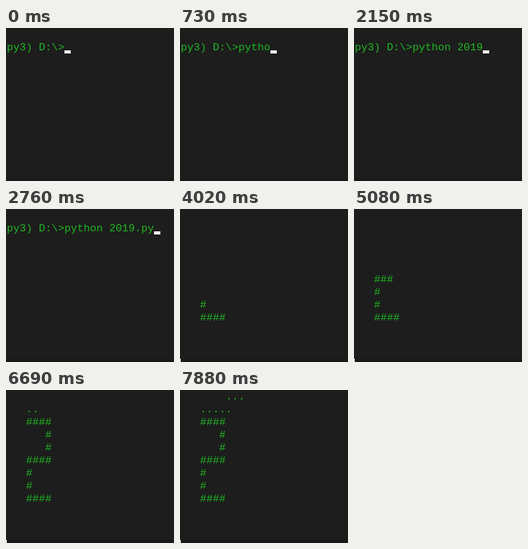
Animation of 210 by 192 pixels, one loop 8 s. Source, as an HTML page:

```html
<!DOCTYPE html>
<html lang="en">
<head>
<meta charset="utf-8">
<title>Terminal drawing</title>
<style>
  html, body { margin: 0; width: 100%; height: 100%; overflow: hidden; background: #1c1d1c; }
  svg { display: block; }
  text {
    font: 13.333px "Liberation Mono", "Courier New", monospace;
    fill: #22b824;
    white-space: pre;
  }
</style>
</head>
<body>
<svg id="stage" width="210" height="192" viewBox="0 0 210 192">
  <rect width="210" height="192" fill="#1c1d1c"/>
  <rect y="188" width="210" height="4" fill="#191919"/>
  <text id="line" x="1" y="28"></text>
  <g id="marks"></g>
  <rect id="cursor" width="8" height="4" fill="#ebebeb"/>
</svg>
<script>
const LOOP = 8000, CLEAR = 3220, CELL = 8, ROW = 16, LEFT = 1, BASE = 12;
const PROMPT = "py3) D:\\>", COMMAND = "python 2019.py";

// Time at which each character of the command appears.
const KEYS = [70, 270, 400, 600, 730, 860, 1130, 1740, 1740, 1940, 2140, 2340, 2540, 2740];

// The trail: start cell, direction, length and character of each stroke.
const STROKES = [
  [6, 8, -1, 0, 4, "#"],
  [3, 7, 0, -1, 3, "#"],
  [4, 5, 1, 0, 3, "#"],
  [6, 4, 0, -1, 3, "#"],
  [5, 2, -1, 0, 3, "#"],
  [3, 1, 1, 0, 5, "."],
  [7, 0, 1, 0, 3, "."],
];

const get = id => document.getElementById(id);
const line = get("line"), group = get("marks"), cursor = get("cursor");
const cellX = col => LEFT + col * CELL;
const rowY = row => BASE + row * ROW;

const marks = STROKES.flatMap(([col, row, dx, dy, count, char]) =>
  Array.from({ length: count }, (_, i) => {
    const mark = document.createElementNS("http://www.w3.org/2000/svg", "text");
    mark.setAttribute("x", cellX(col + dx * i));
    mark.setAttribute("y", rowY(row + dy * i));
    mark.textContent = char;
    return group.appendChild(mark);
  }));

// A new mark every 200 ms, with a short delay midway and a slight lead near the end.
const markTime = i => CLEAR + i * 200 + (i >= 9 ? 70 : 0) - (i >= 22 ? 10 : 0);

function draw(time) {
  const typing = time < CLEAR;
  const typed = KEYS.filter(key => key <= time).length;
  line.textContent = typing ? PROMPT + COMMAND.slice(0, typed) : "";
  cursor.setAttribute("x", cellX(typing ? PROMPT.length + typed : -1));
  cursor.setAttribute("y", rowY(typing ? 1 : 11));
  marks.forEach((mark, i) => {
    mark.style.display = time >= markTime(i) ? "" : "none";
  });
}

const start = performance.now();
function tick() {
  draw((performance.now() - start) % LOOP);
  requestAnimationFrame(tick);
}
tick();
</script>
</body>
</html>
```
